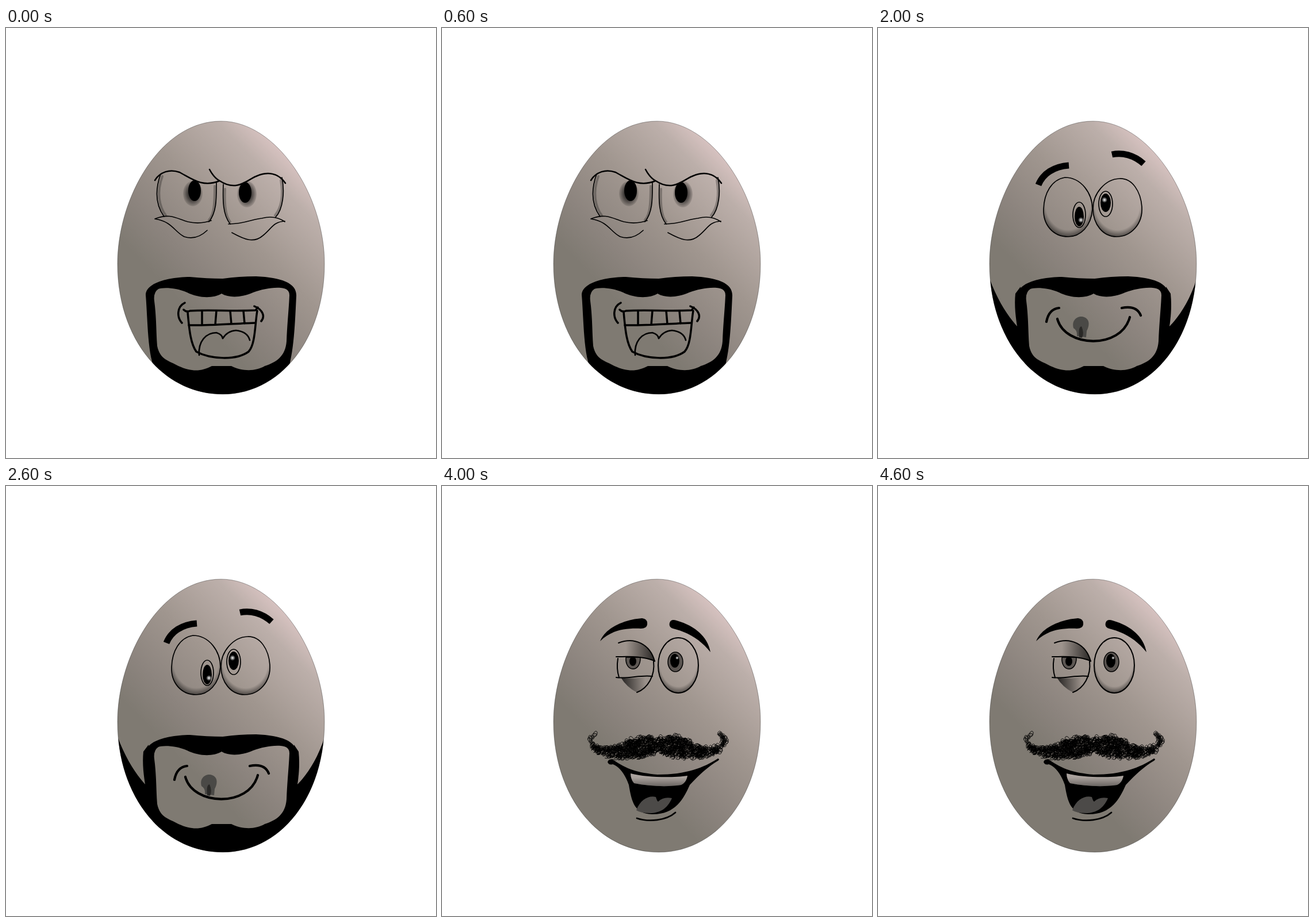
These frames come from a looping animation (748x748 px, 5000 ms). An HTML page:

```html
<!DOCTYPE html>
<html lang="en">
<head>
<meta charset="utf-8">
<title>Egg faces</title>
<style>
html, body { margin: 0; width: 100%; height: 100%; overflow: hidden; background: #fff; }
svg { display: block; width: 100vw; height: 100vh; }
.face { visibility: hidden; fill: none; stroke: #000; stroke-width: 3; stroke-linecap: round; stroke-linejoin: round; }
.face.on { visibility: visible; }
.ink { fill: #000; stroke: none; }
.shade { stroke: none; }
.thin { stroke-width: 1.7; }
</style>
</head>
<body>
<svg viewBox="0 0 748 748">
<defs>
  <linearGradient id="shell" gradientUnits="userSpaceOnUse" x1="500" y1="215" x2="270" y2="441">
    <stop offset="0" stop-color="#dfc8c7"/><stop offset=".18" stop-color="#bcafaa"/>
    <stop offset=".5" stop-color="#a0968f"/><stop offset=".8" stop-color="#8c847e"/>
    <stop offset="1" stop-color="#7f7a72"/>
  </linearGradient>
  <linearGradient id="low" x2="0" y2="1">
    <stop offset=".3" stop-opacity="0"/><stop offset="1" stop-opacity=".75"/>
  </linearGradient>
  <linearGradient id="side">
    <stop offset=".25" stop-opacity="0"/><stop offset="1" stop-opacity=".75"/>
  </linearGradient>
  <radialGradient id="smudge"><stop offset=".5" stop-opacity=".6"/><stop offset="1" stop-opacity=".1"/></radialGradient>
  <radialGradient id="ball" cx=".5" cy=".42" r=".58">
    <stop offset=".8" stop-opacity="0"/><stop offset="1" stop-opacity=".5"/>
  </radialGradient>
  <radialGradient id="glint"><stop offset="0" stop-color="#fff"/><stop offset="1" stop-color="#fff" stop-opacity="0"/></radialGradient>
  <path id="egg" d="M374 162C470 162 554 290 554 410C554 540 478 637 377 637C272 637 194 540 194 410C194 296 268 162 374 162Z"/>
  <clipPath id="inside"><use href="#egg"/></clipPath>
  <path id="beard" fill-rule="evenodd" d="M254 580C246 550 246 500 243 464C243 443 285 433 320 433Q350 436 377 436Q405 432 435 432C480 434 506 444 505 466C503 510 501 550 495 577L480 650H270Z
    M375 462C360 471 335 470 315 460C295 451 272 451 265 454Q256 460 258 475C262 505 261 530 263 553C268 578 285 579 300 588C325 599 340 597 358 588H392C412 598 435 597 450 588C472 581 486 570 488 545C489 515 492 490 493 465Q493 453 478 452C460 451 445 455 430 460C410 469 388 470 375 462Z"/>
</defs>

<use href="#egg" fill="url(#shell)" stroke="#0005"/>

<g class="face">
  <use href="#beard" class="ink" clip-path="url(#inside)"/>
  <path d="M259 265C268 250 285 245 302 251C323 262 342 278 371 266M354 246Q362 261 372 266C402 286 421 263 435 258C455 249 474 252 486 270" stroke-width="2.5"/>
  <path class="thin" d="M269 254C258 285 262 310 275 328M366 269C366 295 367 320 353 337M378 272C377 300 377 325 390 341M480 260C485 285 482 315 469 329"/>
  <path stroke="#0004" stroke-width="4" d="M272 258C262 285 266 310 278 326M363 275C363 305 362 325 353 334M381 280Q379 325 390 337M478 265Q485 305 468 326"/>
  <path class="thin" d="M259 332C285 321 298 332 316 337Q337 342 357 335M259 332C290 337 292 354 310 363Q331 370 350 352M387 341C415 341 430 332 445 331Q468 325 485 337M393 356C415 368 431 375 447 361C462 349 465 337 485 336"/>
  <ellipse class="shade" fill="url(#smudge)" cx="325" cy="288" rx="17" ry="22"/>
  <ellipse class="shade" fill="url(#smudge)" cx="419" cy="289" rx="17" ry="23"/>
  <ellipse class="ink" cx="328" cy="283" rx="11" ry="18"/>
  <ellipse class="ink" cx="416" cy="286" rx="11" ry="18"/>
  <g stroke-width="3.5">
    <path d="M309 490Q314 495 320 492C350 490 400 493 434 491L438 486M316 494C319 530 322 550 331 563C355 576 400 579 422 563C434 550 433 515 437 492"/>
    <path d="M318 517C350 518 400 514 434 513M341 492V517M366 492L364 516M390 492L392 515M413 492L415 514"/>
    <path d="M336 569C334 545 348 530 366 530Q376 533 377 540Q385 527 400 526Q420 528 424 543" stroke-width="2.7"/>
    <path d="M311 478C297 485 297 503 306 513M432 484C447 490 451 502 444 510"/>
  </g>
</g>

<g class="face">
  <path class="ink" d="M268 268C288 248 330 239 357 258Q366 265 356 270C330 268 300 258 268 268ZM385 229C382 218 395 209 410 210C430 215 445 230 455 245C440 240 420 224 395 230Q388 232 385 229Z"/>
  <path d="M376 292C360 291 350 273 325 271C295 268 275 290 277 320C280 346 300 364 330 363C365 362 382 347 383 322C385 345 400 360 420 358C450 350 460 310 456 280C450 250 430 236 408 238C385 242 373 262 376 292Z"/>
  <g class="thin" fill="url(#low)">
    <path d="M332 294C344 294 351 312 349 325C347 350 317 350 315 325C313 311 320 294 332 294Z"/>
    <path d="M418 268C431 268 439 284 438 301C436 333 403 333 401 301C399 284 406 268 418 268Z"/>
  </g>
  <ellipse class="ink" cx="333" cy="321" rx="10" ry="17"/>
  <ellipse class="ink" cx="419" cy="298" rx="11" ry="18"/>
  <circle class="shade" fill="url(#glint)" cx="337" cy="319" r="5"/>
  <circle class="shade" fill="url(#glint)" cx="423" cy="293" r="5"/>
  <path id="fur" class="ink" d="M281 431C292 449 310 442 330 429C345 422 365 424 372 434H377C385 423 405 422 420 430C440 442 455 448 467 432C465 453 445 468 420 469C400 471 385 468 375 461C365 469 345 472 325 468C300 464 285 450 281 431Z"/>
  <path id="spikes" stroke-width="1"/>
  <path stroke-width="3.7" d="M374 474C340 474 323 500 324 528C325 560 335 580 365 582C395 584 420 574 421 540C427 500 418 474 374 474Z"/>
  <path d="M368 477C372 495 370 505 362 515Q360 524 368 522Q374 516 376 516Q378 523 387 523Q394 519 389 510C381 502 387 494 385 486Q379 482 378 476M354 510Q349 515 353 518Q348 523 354 525L356 530M400 508Q406 514 401 518Q405 523 399 526L397 532"/>
  <path d="M346 577C341 557 354 546 366 549Q374 553 375 565Q374 547 393 545Q408 546 406 557Q406 570 386 579"/>
</g>

<g class="face">
  <g class="ink" clip-path="url(#inside)">
    <use href="#beard"/>
    <path d="M190 425C205 470 225 500 242 519C239 500 237 480 239 462L248 450L254 575L300 640H190ZM558 425C545 470 526 500 507 519C510 500 511 480 509 462L501 450L495 575L450 640H558Z"/>
  </g>
  <path stroke-linecap="butt" stroke-width="11" d="M279 273C287 253 306 241 332 239M407 220C425 216 445 221 462 236"/>
  <g class="thin" fill="url(#ball)">
    <path d="M325 260C354 260 373 288 373 315C371 345 352 363 331 363C304 363 287 342 288 315C289 287 302 264 325 260Z"/>
    <path d="M420 262C443 261 457 285 459 311C461 341 440 363 415 363C391 363 374 341 374 314C374 288 395 263 420 262Z"/>
    <ellipse cx="350" cy="325" rx="11" ry="22" fill="none"/>
    <ellipse cx="396" cy="306" rx="12" ry="22" fill="none"/>
  </g>
  <ellipse class="ink" cx="350" cy="328" rx="8" ry="17"/>
  <ellipse class="ink" cx="396" cy="304" rx="9" ry="16"/>
  <circle class="shade" fill="url(#glint)" cx="353" cy="334" r="5"/>
  <circle class="shade" fill="url(#glint)" cx="394" cy="299" r="5"/>
  <path class="shade" fill="#4a4946" d="M346 536Q347 526 340 522C336 507 348 501 355 502C371 505 367 520 363 527L362 538Z"/>
  <path class="shade" fill="#292826" d="M350 538Q348 520 354 519Q359 530 355 539Z"/>
  <path stroke-width="4.2" d="M312 506C325 556 423 560 438 503M293 511Q297 489 315 487M424 487Q450 482 457 500"/>
</g>

<g class="face">
  <g id="half">
    <path class="thin" d="M353 204C357 215 363 222 362 237"/>
    <path class="ink" d="M273 313C268 275 295 243 335 239C344 235 345 228 341 219C350 226 349 245 350 262L347 271C340 262 320 258 305 264C285 272 277 290 274 313Z"/>
    <ellipse class="shade" fill="url(#ball)" cx="316" cy="311" rx="35" ry="48"/>
    <ellipse class="thin" cx="316" cy="311" rx="35" ry="48"/>
    <ellipse cx="314" cy="306" rx="13" ry="18" stroke-width="2"/>
    <ellipse class="ink" cx="314" cy="306" rx="10" ry="15"/>
    <path stroke="#0008" stroke-width="1" d="M308 368Q317 372 326 368"/>
  </g>
  <use href="#half" transform="matrix(-1 0 0 1 749 0)"/>
  <path class="ink" d="M253 450C250 425 275 405 310 400C350 396 400 393 440 400C480 407 505 420 505 445C504 460 500 475 493 487C490 475 480 463 460 457C425 455 395 445 378 427C360 443 330 455 300 458C280 462 268 470 265 487C258 475 254 465 253 450Z"/>
  <path d="M299 483C325 527 415 531 445 482M292 495Q294 480 306 480M434 479Q450 476 452 489M307 498C310 520 320 538 340 542M437 494C436 525 425 540 406 546M359 517C340 522 336 545 339 560C345 587 397 588 403 560C408 540 402 522 390 517M371 518Q372 530 366 537"/>
</g>

<g class="face">
  <path class="ink" d="M275 270C285 245 320 232 348 230Q358 231 357 241Q356 248 346 248C320 247 295 250 275 270ZM396 238Q398 231 408 234C440 243 462 262 467 289C450 268 430 255 402 248Q394 246 396 238Z"/>
  <path class="shade" fill="url(#side)" d="M307 273C335 262 362 275 370 305Q345 295 303 297Z"/>
  <path class="shade" fill="url(#side)" transform="matrix(-1 0 0 1 671 0)" d="M303 331Q340 337 360 333Q350 350 332 359Q310 352 303 331Z"/>
  <path stroke-width="2" d="M307 273C335 262 362 275 370 305M303 297C325 297 345 295 370 304M306 300Q303 318 308 333M303 333C325 336 345 328 366 331M368 305C371 330 358 352 339 359"/>
  <path fill="#0006" stroke-width="1.5" d="M320 298C318 325 346 325 345 298Z"/>
  <ellipse class="ink" cx="332" cy="305" rx="6" ry="8"/>
  <ellipse class="shade" fill="url(#ball)" cx="411" cy="312" rx="35" ry="48"/>
  <ellipse cx="411" cy="312" rx="35" ry="48" stroke-width="2"/>
  <ellipse cx="406" cy="306" rx="13" ry="17" fill="#0007" stroke-width="1.5"/>
  <ellipse class="ink" cx="405" cy="304" rx="8" ry="12"/>
  <circle class="shade" fill="url(#glint)" cx="409" cy="299" r="3"/>
  <path id="curls" class="shade" fill="#0003" d="M270 431C255 432 252 448 262 458C275 475 310 475 340 473C360 472 368 466 374 461C385 470 400 474 430 474C465 474 490 465 493 448C494 435 485 431 477 432C492 440 488 455 470 455C445 458 430 440 405 436C390 434 380 438 374 442C360 433 340 437 325 443C300 455 285 458 270 454C258 450 260 438 270 431Z"/>
  <path id="scribble" stroke-width=".9"/>
  <path class="ink" d="M288 480Q291 473 299 477C320 492 340 499 375 502C425 502 455 490 480 474Q484 475 480 478C460 490 445 505 431 520C420 545 405 572 365 571C335 570 330 550 325 520C318 500 308 488 297 484Q290 486 288 480Z"/>
  <path class="shade" fill="#aaa29d" d="M328 500C355 507 400 508 427 504Q425 516 416 520C390 524 360 522 334 517Q328 510 328 500Z"/>
  <path class="shade" fill="url(#low)" opacity=".5" d="M328 500C355 507 400 508 427 504Q425 516 416 520C390 524 360 522 334 517Q328 510 328 500Z"/>
  <path class="shade" fill="#4c4a48" d="M338 564C345 545 360 538 372 541Q374 548 376 549Q385 540 400 543C392 562 378 569 362 569Q345 569 338 564Z"/>
  <path stroke-width="2.8" d="M339 578C360 585 390 582 406 568"/>
</g>
</svg>
<script>
const byId = id => document.getElementById(id);
const faces = document.querySelectorAll('.face');
let seed = 7;
const rand = () => (seed = seed * 16807 % 2147483647) / 2147483647;

function draw() {
  const now = Math.floor(performance.now() % 5000 / 1000);
  faces.forEach((face, i) => face.classList.toggle('on', i === now));
  requestAnimationFrame(draw);
}
draw();

// Short hairs along the rim of the furry moustache
const fur = byId('fur'), rim = fur.getTotalLength();
let hairs = '';
for (let s = 0; s < rim; s += 1.5) {
  const p = fur.getPointAtLength(s), q = fur.getPointAtLength((s + 1) % rim);
  const outward = p.x < 374 === p.y < 450 ? -2.4 : -0.7;
  const angle = Math.atan2(q.y - p.y, q.x - p.x) + outward + rand() * 0.6 - 0.3;
  const size = 2 + rand() * 4;
  hairs += `M${p.x} ${p.y}l${size * Math.cos(angle)} ${size * Math.sin(angle)}`;
}
byId('spikes').setAttribute('d', hairs);

// Tiny open loops filling the curly moustache
const curls = byId('curls'), spot = curls.ownerSVGElement.createSVGPoint();
let loops = '';
for (let i = 0; i < 1800; i++) {
  spot.x = 254 + rand() * 240;
  spot.y = 430 + rand() * 45;
  const r = 1.5 + rand() * 2.2, turn = rand() * 180;
  if (curls.isPointInFill(spot))
    loops += `M${spot.x - r} ${spot.y}a${r} ${r * 1.5} ${turn} 1 1 ${r} ${r}`;
}
byId('scribble').setAttribute('d', loops);
</script>
</body>
</html>
```
